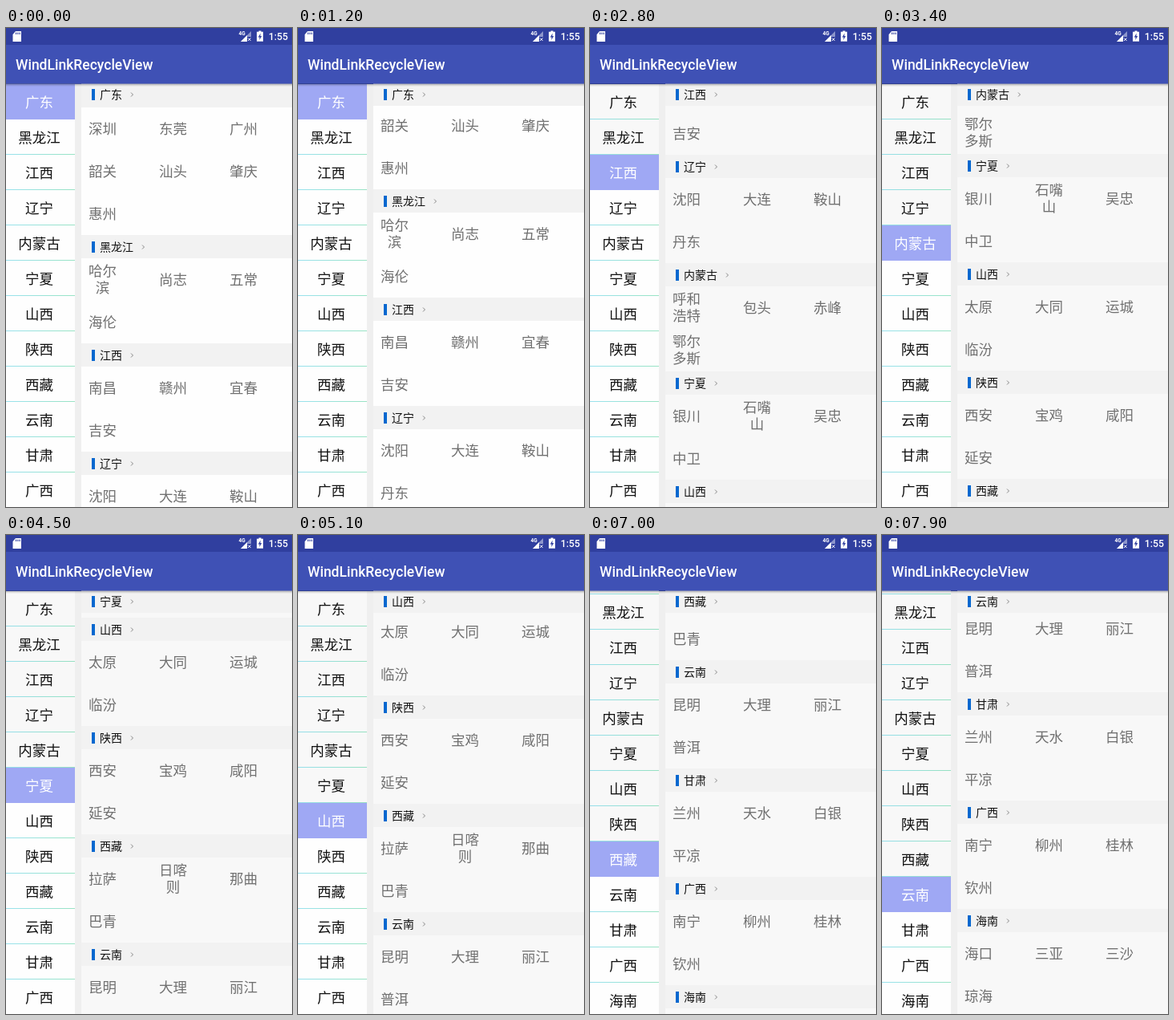
An HTML page with a canvas that plays this animation: 357 px wide and 597 px high, repeating every 8000 ms.

```html
<!DOCTYPE html>
<html lang="zh-CN">
<head>
<meta charset="utf-8">
<style>
  html, body { margin: 0; width: 100%; height: 100%; overflow: hidden; }
  canvas { display: block; }
</style>
</head>
<body>
<canvas id="stage" width="357" height="597"></canvas>
<script>
const ctx = document.getElementById('stage').getContext('2d');
const CJK = '"Noto Sans CJK SC", "Noto Sans CJK", sans-serif';
const LOOP = 8000, TOP = 70, HEADER = 29, ROW = 53, ITEM = 44;

const sections = `广东 深圳 东莞 广州 韶关 汕头 肇庆 惠州
黑龙江 哈尔滨 尚志 五常 海伦
江西 南昌 赣州 宜春 吉安
辽宁 沈阳 大连 鞍山 丹东
内蒙古 呼和浩特 包头 赤峰 鄂尔多斯
宁夏 银川 石嘴山 吴忠 中卫
山西 太原 大同 运城 临汾
陕西 西安 宝鸡 咸阳 延安
西藏 拉萨 日喀则 那曲 巴青
云南 昆明 大理 丽江 普洱
甘肃 兰州 天水 白银 平凉
广西 南宁 柳州 桂林 钦州
海南 海口 三亚 三沙 琼海`.split('\n').map(line => {
  const [name, ...cities] = line.split(' ');
  return { name, cities };
});
let offset = 0;
for (const s of sections) {
  s.top = offset;
  offset += HEADER + ROW * Math.ceil(s.cities.length / 3);
}

// [time in ms, scroll offset of the city list]
const scrollKeys = [
  [0, 0], [1000, 0], [1300, 85], [1600, 132], [1900, 132], [2000, 197],
  [2100, 255], [2300, 310], [2700, 310], [2900, 430], [3100, 560],
  [3400, 641.5], [3800, 641.5], [4100, 730], [4500, 830.5], [4700, 860],
  [4800, 860], [4900, 866], [5000, 866], [5100, 868], [5600, 868],
  [5700, 885], [5900, 965], [6000, 997], [6100, 1013.5], [6400, 1035],
  [6700, 1035], [6800, 1060], [6900, 1125], [7000, 1182.5], [7200, 1230],
  [7400, 1245], [7800, 1245], [7900, 1277.5]
];

function scrollAt(t) {
  const i = scrollKeys.findIndex(k => k[0] >= t);
  if (i < 1) return scrollKeys[0][1];
  const [t0, s0] = scrollKeys[i - 1], [t1, s1] = scrollKeys[i];
  return s0 + (s1 - s0) * (t - t0) / (t1 - t0);
}

function rect(x, y, w, h, color) {
  ctx.fillStyle = color;
  ctx.fillRect(x, y, w, h);
}

function shape(points, color) {
  ctx.fillStyle = color;
  ctx.beginPath();
  for (const [x, y] of points) ctx.lineTo(x, y);
  ctx.fill();
}

function text(str, x, y, font, color, align = 'left') {
  ctx.font = font;
  ctx.fillStyle = color;
  ctx.textAlign = align;
  ctx.fillText(str, x, y);
}

function header(name, top) {
  const mid = top + 15, end = 117 + name.length * 14;
  rect(94, top, 263, HEADER, '#f2f2f2');
  rect(107, mid - 7, 4, 14, '#0768cf');
  text(name, 117, mid + 5, '14px ' + CJK, '#111');
  ctx.strokeStyle = '#888';
  ctx.lineWidth = 1;
  ctx.beginPath();
  ctx.moveTo(end + 11, mid - 2.5);
  ctx.lineTo(end + 13.5, mid);
  ctx.lineTo(end + 11, mid + 2.5);
  ctx.stroke();
}

function city(name, x, mid) {
  const lines = name.match(/.{1,2}/g);
  lines.forEach((line, i) => {
    const y = mid + (i - (lines.length - 1) / 2) * 20.5;
    text(line, x, Math.round(y + 6.5), '17.5px ' + CJK, '#707070', 'center');
  });
}

function cityList(scroll, selected, color) {
  rect(94, TOP, 263, 527, color);
  for (const s of sections) {
    const top = Math.round(TOP + s.top - scroll);
    header(s.name, top);
    s.cities.forEach((name, i) =>
      city(name, 120.5 + i % 3 * 88, top + HEADER + 26 + Math.floor(i / 3) * ROW));
  }
  const next = sections[selected + 1];
  const nextTop = Math.round(TOP + next.top - scroll);
  header(sections[selected].name, Math.min(68, nextTop - HEADER));
}

function provinceList(selected) {
  const shift = selected >= 7 ? 40 : 0;
  const line = ctx.createLinearGradient(0, 0, 86, 0);
  line.addColorStop(0, '#35c5de');
  line.addColorStop(1, '#35c98a');
  rect(86, TOP, 8, 527, '#efefef');
  sections.forEach(({ name }, i) => {
    const y = TOP + i * ITEM - shift, active = i === selected;
    rect(0, y, 86, ITEM, active ? '#9fa8f4' : i < selected ? '#f8f8f8' : '#fefefe');
    if (!active) rect(0, y + ITEM - 0.5, 86, 1.2, line);
    text(name, 41.5, y + 28.5, '17.5px ' + CJK, active ? '#fff' : '#111', 'center');
  });
}

function appBar() {
  const shadow = ctx.createLinearGradient(0, 69, 0, 73);
  shadow.addColorStop(0, 'rgba(0,0,0,.3)');
  shadow.addColorStop(1, 'rgba(0,0,0,0)');
  rect(0, 69, 357, 4, shadow);
  rect(0, 0, 357, 21, '#303f9f');
  rect(0, 21, 357, 48.5, '#3f51b5');
  text('WindLinkRecycleView', 12, 52, '500 17.5px Roboto, sans-serif', '#fff');
  text('1:55', 352, 15, '500 12.25px Roboto, sans-serif', '#fff', 'right');

  // memory card
  shape([[12, 4], [19, 4], [19, 17], [8.5, 17], [8.5, 8]], '#fff');
  for (const x of [12, 14.3, 16.6]) rect(x, 5.5, 1.1, 2.5, '#303f9f');

  // mobile signal
  shape([[306, 4], [306, 17], [293, 17]], '#8d96cb');
  shape([[301, 9], [301, 17], [293, 17]], '#fff');
  rect(301, 11, 5, 6, '#303f9f');
  ctx.strokeStyle = '#fff';
  ctx.beginPath();
  ctx.moveTo(302, 12.5); ctx.lineTo(305.5, 16);
  ctx.moveTo(305.5, 12.5); ctx.lineTo(302, 16);
  ctx.stroke();
  text('4G', 290.5, 9, '700 6.5px Roboto, sans-serif', '#fff');

  // battery
  rect(315.5, 3.5, 3, 2, '#fff');
  rect(313, 4.7, 8, 12, '#fff');
  shape([[317.7, 6.5], [314.8, 11.5], [316.6, 11.5], [316.3, 15], [319.2, 10], [317.4, 10]], '#303f9f');
}

function draw(now) {
  const t = Math.floor(now % LOOP / 100) * 100;
  const scroll = scrollAt(t);
  const selected = sections.filter(s => s.top <= scroll).length - 1;
  cityList(scroll, selected, t < 2000 ? '#fefefe' : '#f8f8f8');
  provinceList(selected);
  appBar();
}

const start = performance.now();
function tick() {
  draw(performance.now() - start);
  requestAnimationFrame(tick);
}
tick();
</script>
</body>
</html>
```
